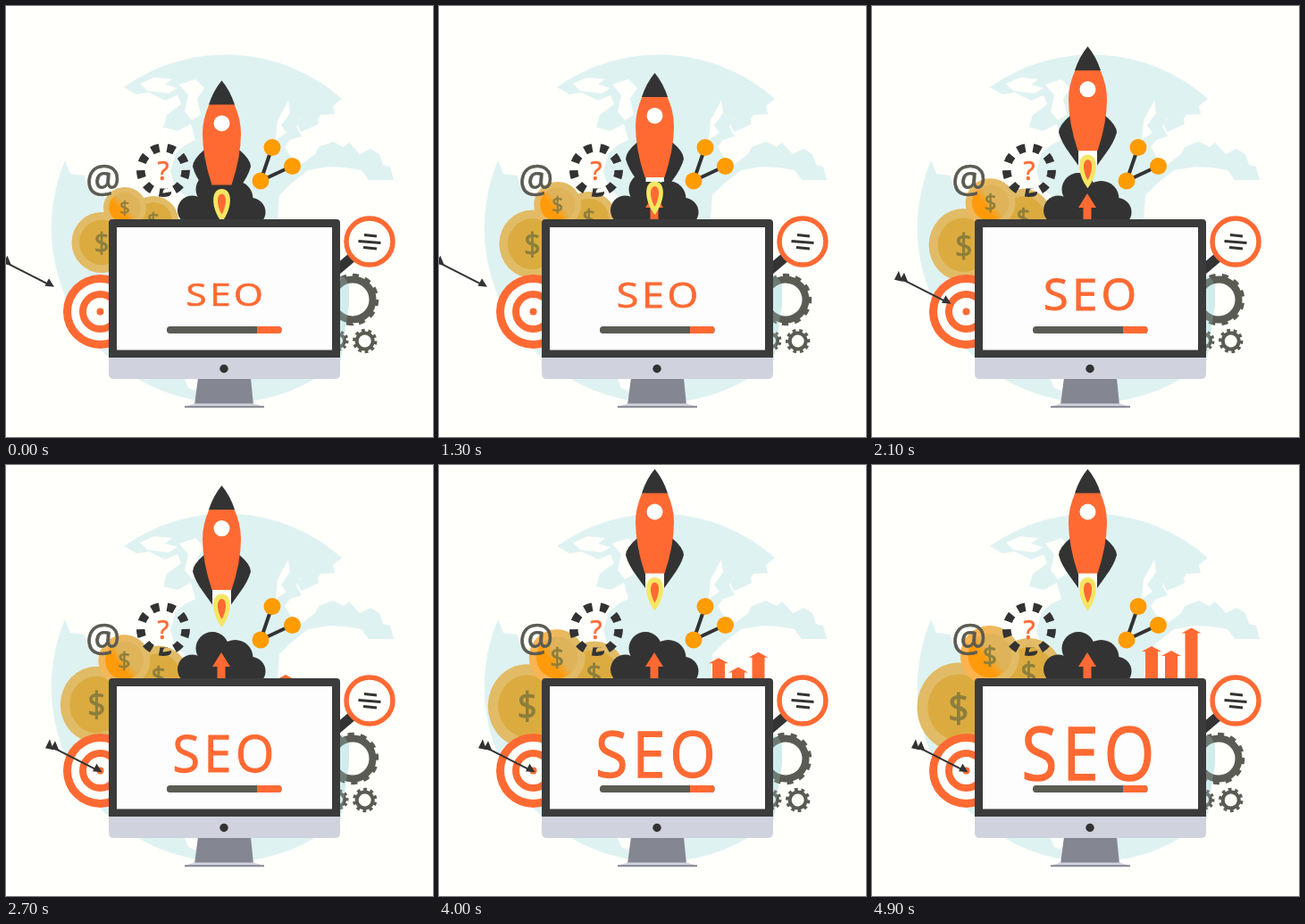
Recreate the animation shown at these times as an HTML page. Size 478 px wide and 483 px high, loop 5 s.

```html
<!DOCTYPE html>
<html lang="en">
<head>
<meta charset="utf-8">
<title>SEO launch</title>
<style>
html, body { margin: 0; width: 100%; height: 100%; overflow: hidden; background: #fffffb; }
svg { display: block; width: 100vw; height: 100vh; }
text { font-family: "Open Sans", "Noto Sans", sans-serif; stroke-width: .7; }
.dark { fill: #333; }
.hot { fill: #ff6a33; }
text.hot { stroke: #ff6a33; }
.sky { fill: #dff2f2; }
.paper { fill: #fffffb; }
.grey { fill: #5a5b52; }
text.grey { stroke: #5a5b52; }
.ring { fill: none; stroke: #5a5b52; }
.cash { fill: #8d7e3c; stroke: #8d7e3c; font-size: 29.5px; text-anchor: middle; }
</style>
</head>
<body>
<svg viewBox="0 0 478 483">
  <defs>
    <linearGradient id="rim"><stop offset=".3" stop-color="#ffb34f"/><stop offset=".75" stop-color="#ffb34f" stop-opacity="0"/></linearGradient>
    <linearGradient id="core" x1="0" y1="1" x2="1" y2=".2"><stop offset=".42" stop-color="#ff9b0a"/><stop offset=".6" stop-color="#dfb35a"/></linearGradient>
    <g id="coin">
      <circle r="33" fill="#e1bb66"/><circle r="24.5" fill="#dcab40"/>
      <text class="cash" y="10.6">$</text>
    </g>
    <g id="bar"><path class="hot" d="M0 0L11 6H7V66H-7V6H-11Z"/></g>
    <clipPath id="above"><path d="M0 0H478V197H0Z"/></clipPath>
  </defs>

  <!-- globe -->
  <path class="sky" d="M132 91A196 196 0 0 1 376 104L366 112 368 121 352 122 346 131 330 126 325 135 331 146 318 150 312 158 318 168 330 178 346 166 350 158 366 152 378 158 384 153 396 166 408 160 418 166 422 178 430 180 434 195 406 195 398 184 380 181 362 180 338 184 318 200 306 212 304 240H200V212L190 205 184 185 190 165 200 156 212 150 207 132 192 140 176 136 180 122 196 110 192 100 178 106 160 97 146 99Z"/>
  <path class="sky" d="M66 173A196 196 0 0 0 375 397L380 360 384 335 384 310 374 300 300 240H130L120 215 100 213 90 200 88 190 72 188Z"/>
  <path class="paper" d="M150 87L166 80 186 82 178 88 192 92 182 98 158 95ZM194 88L212 82 222 92 214 104 218 122 208 128 200 118 204 100ZM316 106L318 120 308 134 314 142 302 150 304 128ZM200 418H215L213 432 204 428Z"/>
  <path class="sky" d="M326 132L336 120 348 123 350 132 340 137 330 141Z"/>

  <!-- gears -->
  <g id="gearA"><circle class="ring" r="22.5" stroke-width="8"/><circle class="ring" r="26.7" stroke-width="5" pathLength="24" stroke-dasharray="1"/></g>
  <g id="gearB"><circle class="ring" r="9" stroke-width="4"/><circle class="ring" r="11.7" stroke-width="4" pathLength="20" stroke-dasharray="1"/></g>
  <g id="gearC"><circle class="ring" r="7" stroke-width="4"/><circle class="ring" r="9.5" stroke-width="4" pathLength="20" stroke-dasharray="1"/></g>
  <path fill="#a8d8d8" opacity=".25" d="M374 302Q384 305 384 320V335L380 360 376 390H374Z"/>

  <!-- coins -->
  <use id="coinC" href="#coin"/>
  <use id="coinA" href="#coin"/>
  <g id="coinB">
    <circle r="33" fill="#e1bb66"/><circle id="glow" r="33" fill="url(#rim)"/>
    <circle r="24.5" fill="url(#core)"/><text class="cash" y="10.6">$</text>
  </g>
  <text class="grey" x="89" y="208.700" font-size="44">@</text>

  <circle cx="176" cy="184" r="25.200" fill="none" stroke="#333" stroke-width="9.500" pathLength="18" stroke-dasharray="1" transform="rotate(80 176 184)"/>
  <text class="hot" x="176" y="195" font-size="30" text-anchor="middle">?</text>

  <!-- target -->
  <g transform="translate(105.5 342.5)">
    <circle class="hot" r="41.500"/><circle class="paper" r="32.500"/>
    <circle class="hot" r="23.500"/><circle class="paper" r="15.500"/><circle class="hot" r="4"/>
  </g>
  <g id="dart" class="dark">
    <path d="M50 316L103 343" stroke="#333" stroke-width="2"/>
    <path d="M107.500 345L97 344 101.500 335.500ZM44 318L49 308 53 320ZM50 319L55 310 59.500 321Z"/>
  </g>

  <!-- network and chart -->
  <path d="M298 158L285 196 320 179.500" fill="none" stroke="#333" stroke-width="4"/>
  <g fill="#ff9c00"><circle cx="298" cy="158.500" r="9.500"/><circle cx="320.500" cy="179.500" r="9.500"/><circle cx="285" cy="196" r="9.500"/></g>
  <use id="barA" href="#bar"/><use id="barB" href="#bar"/><use id="barC" href="#bar"/>

  <!-- magnifier -->
  <path d="M368 298L388 281" stroke="#333" stroke-width="11"/>
  <circle cx="407" cy="264" r="26" fill="#fffffb" stroke="#ff6a33" stroke-width="5.500"/>
  <path d="M401 256.500L415 258M394.500 263.500L419.500 265.500M400 270.500L415 272" stroke="#333" stroke-width="3"/>

  <!-- cloud and rocket -->
  <g class="dark">
    <circle cx="208.500" cy="229" r="16.500"/><circle cx="231" cy="205.500" r="18.500"/>
    <circle cx="256.500" cy="216" r="20"/><circle cx="274.500" cy="231" r="16"/>
    <path d="M205 222H277V245H205Z"/>
  </g>
  <path id="lift" class="hot" d="M241 210L251 226H245.500V242H236.500V226H231Z"/>
  <g id="fins"><path class="dark" d="M222 82Q209 93 209 101Q212 112 221 124L231 138V118H252V138L262 124Q271 112 274 101Q274 93 261 82Z"/></g>
  <g clip-path="url(#above)"><path id="nozzle" fill="#fbfdfc" d="M231.500 120H251.500V138H231.500Z"/></g>
  <g id="rocket">
    <path class="hot" d="M227.500 31H255.500Q263 48 263 64Q263 90 252.500 121.500H230.500Q220 90 220 64Q220 48 227.500 31Z"/>
    <path class="dark" d="M241.500 4.500Q251 16 256 31.500H227Q232 16 241.500 4.500Z"/>
    <circle cx="241.500" cy="52.500" r="9" fill="#fff"/>
    <path fill="#f5e663" d="M241.500 126C254 126 254 147 241.500 163.500C229 147 229 126 241.500 126Z"/>
    <path class="hot" d="M241.500 131.500C247.500 132 247.500 144 241.500 154.500C235.500 144 235.500 132 241.500 131.500Z"/>
  </g>

  <!-- monitor -->
  <path fill="#848791" d="M215 417H274L277 447H211Z"/>
  <path fill="#d0d3dd" d="M200 449L211 445.500H277L289 449Z"/>
  <path fill="#848791" d="M200 448.300H289V450.300H200Z"/>
  <path fill="#d0d3dd" d="M115 392H374V412Q374 418 368 418H121Q115 418 115 412Z"/>
  <path fill="#3b3b3b" d="M115 394V243Q115 239 119 239H370Q374 239 374 243V394Z"/>
  <path fill="#fdfdfd" d="M124 248H365V385.500H124Z"/>
  <circle class="dark" cx="244" cy="406.500" r="4.700"/>
  <rect class="grey" x="180" y="359" width="128.500" height="8" rx="3.500"/>
  <path class="hot" d="M281 359H305Q308.500 359 308.500 363T305 367H281Z"/>
  <text id="word" class="hot" x="-36.750" y="12.800" font-size="36" letter-spacing="3">SEO</text>
</svg>
<script>
const $ = id => document.getElementById(id);
const ramp = (t, from, to) => Math.min(1, Math.max(0, (t - from) / (to - from)));
const mix = (a, b, p) => a + (b - a) * p;
const place = (id, x, y, more = "") =>
  $(id).setAttribute("transform", `translate(${x} ${y}) ${more}`);

// centre x, y and radii at the start and at the end
const coins = {
  coinA: [[107, 265, 33.5, 34], [97, 271.5, 46.5, 50]],
  coinB: [[133, 226, 24, 23], [132, 213.5, 33, 33.5]],
  coinC: [[165, 240, 28, 27], [175.5, 234, 38, 40]]
};
// x, final top, speed in px per ms
const bars = { barA: [313, 203, .0146], barB: [335, 208, .0205], barC: [357.5, 182.5, .0302] };

function draw(t) {
  const grow = t / 4900;
  for (const id in coins) {
    const [a, b] = coins[id];
    const [x, y, rx, ry] = a.map((v, i) => mix(v, b[i], grow));
    place(id, x, y, `scale(${rx / 33} ${ry / 33})`);
  }
  $("glow").setAttribute("opacity", grow);

  for (const id in bars) {
    const [x, top, speed] = bars[id];
    place(id, x, top + (4900 - t) * speed);
  }

  const rise = mix(79, 0, ramp(t, 1070, 3200));
  for (const id of ["fins", "nozzle", "rocket"]) place(id, 0, rise);
  $("lift").setAttribute("visibility", t < 1100 ? "hidden" : "visible");

  const away = 1 - ramp(t, 1520, 2420);
  place("dart", -53.5 * away, -29.5 * away - .7);

  const p = ramp(t, 970, 4900);
  place("word", mix(244.5, 241.5, p), mix(323.7, 324.3, p),
    `scale(${mix(83, 143, p) / 71} ${mix(26.5, 62, p) / 27.2})`);

  const turn = t / 5000;
  place("gearA", 388, 329, `rotate(${90 * turn})`);
  place("gearB", 401.7, 375.5, `rotate(${-180 * turn})`);
  place("gearC", 372, 375, `rotate(${180 * turn})`);
}

function tick() {
  draw(Math.floor(performance.now() % 5000 / 100) * 100);
  requestAnimationFrame(tick);
}
tick();
</script>
</body>
</html>
```
